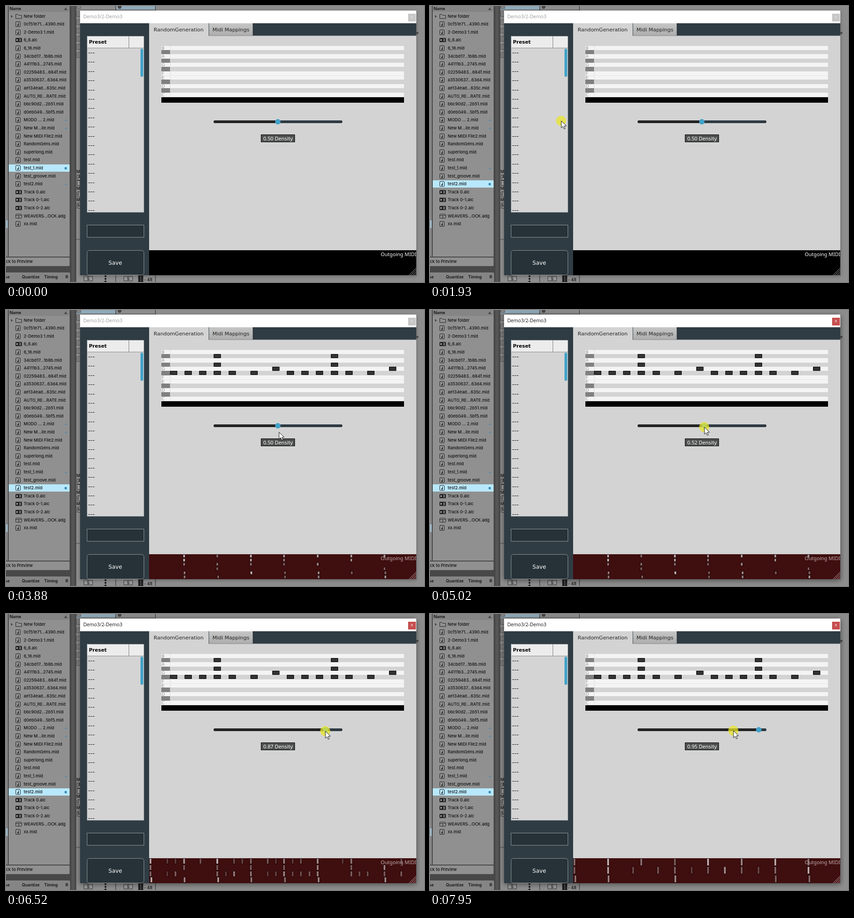
An HTML page with a canvas for the animation above (8000 ms loop, 920 px wide and 608 px high).

```html
<!DOCTYPE html>
<html lang="en">
<head>
<meta charset="utf-8">
<title>MIDI density demo</title>
<style>
html, body { margin: 0; width: 100%; height: 100%; overflow: hidden; background: #909090; }
canvas { display: block; }
</style>
</head>
<body>
<canvas id="stage" width="920" height="608"></canvas>
<script>
const ctx = document.getElementById('stage').getContext('2d');
const LOOP = 8000;
const UI = '"DejaVu Sans", sans-serif', LIST = 'Inter, sans-serif', NOTO = '"Noto Sans", sans-serif';
const BLUE = '#42a2c8';
const SLIDER = { x: 457.8, w: 281, y: 255 };

// A trailing * marks files that are in use.
const FILES = ['New folder', '0cf51e71...4390.mid', '2-Demo3 1.mid', '6_8.alc', '6_16.mid',
  '34cbd17...1b8b.mid', '44111b3...2745.mid', '02259483...684f.mid', 'a3530637...63d4.mid',
  'ae134ead...635c.mid', 'AUTO_RE...RATE.mid', 'bbc90d2...2b51.mid', 'd0eb049...5bf5.mid',
  'MODO ... 2.mid*', 'New M...ile.mid*', 'New MIDI File2.mid', 'RandomGens.mid', 'superlong.mid',
  'test.mid', 'test_1.mid*', 'test_groove.mid', 'test2.mid*', 'Track 0.alc', 'Track 0-1.alc',
  'Track 0-2.alc', 'WEAVERS...OCK.adg', 'xx.mid'];

// Pointer moves: start, end, and the place reached.
const MOVES = [[0, 180, 569, 530], [180, 500, 210, 290], [500, 850, 55, 391], [1440, 2300, 465, 150],
  [3540, 3880, 601, 269], [4010, 4220, 599, 257], [4950, 5900, 662.5, 267],
  [5900, 6590, 707.7, 257], [6790, 7070, 723.5, 256], [7740, 7950, 668, 257]];
const CLICK = 1110, DROP = 2330, OUTPUT = 3740, FOCUS = 4480, RELEASE = 6590, JUMP = 7270;
const PRESSES = [[CLICK, DROP], [FOCUS, RELEASE + 60], [JUMP, JUMP + 140], [7930, LOOP]];

function pointer(t) {
  let x = 569, y = 530;
  for (const [a, b, tx, ty] of MOVES) {
    const u = Math.min(1, Math.max(0, (t - a) / (b - a)));
    x += (tx - x) * u;
    y += (ty - y) * u;
  }
  return [x, y];
}

function density(t) {
  const [x] = pointer(t < JUMP ? Math.min(t, RELEASE) : JUMP);
  return t < FOCUS ? 0.5 : (x - SLIDER.x) / SLIDER.w;
}

function random(seed) {
  return () => {
    seed = (seed * 16807) % 2147483647;
    return seed / 2147483647;
  };
}

function box(x, y, w, h, fill, stroke, r = 0) {
  ctx.beginPath();
  ctx.roundRect(x, y, w, h, r);
  if (fill) { ctx.fillStyle = fill; ctx.fill(); }
  if (stroke) { ctx.strokeStyle = stroke; ctx.stroke(); }
}

function text(s, x, y, font, fill = '#111', align = 'left') {
  ctx.font = font;
  ctx.fillStyle = fill;
  ctx.textAlign = align;
  ctx.fillText(s, x, y);
}

function poly(points, fill, stroke) {
  ctx.beginPath();
  points.forEach(([x, y]) => ctx.lineTo(x, y));
  ctx.closePath();
  if (fill) { ctx.fillStyle = fill; ctx.fill(); }
  if (stroke) { ctx.strokeStyle = stroke; ctx.stroke(); }
}

function disc(x, y, r, fill) {
  ctx.beginPath();
  ctx.arc(x, y, r, 0, 7);
  ctx.fillStyle = fill;
  ctx.fill();
}

function line(x1, y1, x2, y2, color, width = 1) {
  ctx.beginPath();
  ctx.moveTo(x1, y1);
  ctx.lineTo(x2, y2);
  ctx.strokeStyle = color;
  ctx.lineWidth = width;
  ctx.stroke();
  ctx.lineWidth = 1;
}

function fileIcon(name, y) {
  if (name.endsWith('.mid')) {
    box(21.5, y - 5.5, 10, 11, null, '#222', 1.5);
    line(27.5, y - 3, 27.5, y + 2.5, '#111');
    box(25, y + 1, 3, 2.5, '#111');
  } else if (name.endsWith('.alc')) {
    box(21, y - 4.5, 14, 9, '#1c1c1c', null, 1);
    poly([[23, y - 2.5], [27, y], [23, y + 2.5]], '#bbb');
    for (let d = -2; d <= 2; d += 2) box(29, y + d - 0.5, 4, 1, '#bbb');
  } else if (name.endsWith('.adg')) {
    box(21.5, y - 4.5, 13, 9, null, '#222', 1);
    line(22, y - 1.5, 34, y - 1.5, '#222');
    line(28, y - 1.5, 28, y + 4, '#222');
  } else {
    poly([[21.5, y + 4.5], [21.5, y - 4.5], [26, y - 4.5], [28, y - 2.5], [34.5, y - 2.5], [34.5, y + 4.5]], null, '#222');
    poly([[11, y - 3], [15, y], [11, y + 3]], '#444');
  }
}

function drawBrowser(selected) {
  const bold = '600 9px ' + LIST, plain = '500 9.2px ' + LIST;
  box(0, 0, 154, 608, '#484848');
  box(0, 0, 4, 552, '#868686');
  box(0, 472, 4, 17, '#9fb7c5');
  box(6, 0, 134, 552, '#909090');
  box(6, 0, 134, 13, '#858585');
  box(144, 0, 7, 608, '#555');
  text('Name', 8, 6, bold);
  poly([[128, 9], [135, 9], [131.5, 3]], '#484848');
  FILES.forEach((entry, i) => {
    const name = entry.replace('*', ''), chosen = name === selected;
    const y = Math.round(22.5 + i * 17.6);
    if (chosen) box(6, y - 8, 134, 16, '#b8e8fc');
    fileIcon(name, y);
    text(name, 39, y, plain);
    if (chosen) box(129, y - 2, 5, 5, '#3f91b8');
    else if (entry !== name) poly([[129, y + 2], [134, y + 2], [133, y - 2]], '#468fad');
  });
  box(-4, 554, 144, 19, '#909090', null, 2);
  text('ck to Preview', 0, 563, plain);
  box(-4, 587, 145, 25, '#858585', null, 3);
  text('se', -2, 597, bold);
  text('Quantize', 35, 597, bold);
  text('Timing', 84, 597, bold);
  text('R', 131, 597, bold);
}

function drawTracks(first) {
  const small = '500 9px ' + LIST;
  box(154, 0, 766, 608, '#8e8e8e');
  box(first ? 155 : 243, 0, 86, 8, '#91aaba');
  for (let x = 154; x < 340; x += 87.5) line(x, 0, x, 608, '#4a4a4a', 1.5);
  line(154, 9, 329, 9, '#555');
  disc(250, 2, 4, '#454545');
  for (let y = 0; y < 120; y += 18) box(155.5, y - 5.5, 9, 11, '#828282', '#5b5b5b');
  [...'MA⋮MIMN'].forEach((s, i) => {
    const y = 365 + i * 12.5;
    if (s !== 'M') box(156.5, Math.round(y) - 5.5, 12, 11, '#9b9b9b', '#333');
    text(s, s === 'M' ? 155 : 158, y, small);
  });
  line(154, 514, 163, 514, '#444');
  for (const x of [171, 259]) {
    box(x + 0.5, 595.5, 19, 10, '#989898', '#333');
    text('S', x + 10, 601, small, '#111', 'center');
  }
  for (let y = 595; y < 608; y += 6) disc(219, y, 2.2, '#222');
  box(291, 590, 11, 18, '#222');
  box(296, 590, 1, 18, '#666');
  text('- 48', 304, 603, small);
  text('e', 903, 59, small, '#222');
}

function drawFrame(active) {
  ctx.save();
  ctx.shadowColor = active ? 'rgba(0,0,0,.5)' : 'rgba(0,0,0,.3)';
  ctx.shadowBlur = active ? 12 : 8;
  ctx.shadowOffsetY = 2;
  box(163, 10, 740, 583, '#303c44');
  ctx.restore();
  box(163, 10, 740, 28, '#fff');
  text('Demo3/2-Demo3', 170, 24, '10.7px "Open Sans", sans-serif', active ? '#111' : '#999');
  box(885, 17, 17, 17, active ? '#c64f4f' : '#c7c7c7');
  text('x', 893.5, 25, '9px ' + UI, active ? '#fff' : '#e6e6e6', 'center');
}

function drawPresets() {
  box(178, 66, 125, 388, '#d4d4d4');
  box(178, 66, 125, 26, '#ececec');
  line(178, 92.5, 303, 92.5, '#8a8a8a');
  line(270.5, 67, 270.5, 92, '#777');
  text('Preset', 182.5, 80.5, 'bold 10.7px ' + UI, '#000');
  for (let i = 0; i < 18; i++) {
    for (let j = 0; j < 3; j++) box(181 + j * 5, 103 + Math.round(i * 20.4), 4, 1, '#222');
  }
  box(296, 94, 6, 62, BLUE, null, 3);
  box(178.5, 66.5, 125, 388, null, '#8e989b');
  box(178.5, 482.5, 125, 27, '#263238', '#8e989b');
  box(178.5, 538.5, 125, 54, '#263238', '#8e989b', 5);
  text('Save', 240.5, 566.5, '12.2px ' + UI, '#fff', 'center');
}

function drawRoll(filled) {
  const rowY = row => Math.floor(88 + row * 9.37);
  box(342, 88, 534, 113, '#d3d3d3');
  [...'B-A-G-FE-D-C'].forEach((key, i) => {
    const y = rowY(i), h = rowY(i + 1) - y;
    if (key === '-') return box(342, y, 19, h, '#808080');
    box(342, y, 534, h, '#f4f4f4');
    line(361.5, y, 361.5, y + h, '#ddd');
    text(key, 342.5, y + 5.5, '9.5px ' + UI, '#929292');
  });
  line(342, 153.5, 876, 153.5, '#e4e4e4');
  box(342, 201, 534, 12, '#000');
  if (!filled) return;
  const note = (beat, row) => box(Math.round(361 + beat * 32.14) + 0.5, rowY(row) + 0.5, 15, 8, '#333', '#000');
  for (const bar of [0, 8]) {
    for (let beat = 0; beat < 5; beat++) note(bar + beat, 5);
    note(bar + 5.5, 5);
    note(bar + 3, 1);
    note(bar + 3, 3);
    note(bar + 7, 4);
  }
}

function drawSlider(v) {
  const { x, w, y } = SLIDER, thumb = x + w * v;
  ctx.lineCap = 'round';
  line(x + 2.2, y, x + w - 1.3, y, '#2e3a43', 6);
  line(x + 2.2, y, thumb, y, '#222', 6);
  ctx.lineCap = 'butt';
  disc(thumb, y, 6, BLUE);
  box(561.5, 283.5, 74, 16, '#4e504f', '#000');
  text(v.toFixed(2) + ' Density', 598.7, 292.5, '11.3px ' + NOTO, '#fff', 'center');
}

// Denser settings use fewer, taller rows; beats sound most often and loudest.
function drawNotes(v) {
  const level = [0.57, 0.86, 0.92].filter(limit => v >= limit).length;
  const rows = 6 - level, rowH = 55 / rows;
  const first = Math.max(0, 4 - 2 * level), last = level < 2 ? 28 : 31;
  const rnd = random(4021 + level * 977);
  for (let row = 0; row < rows; row++) {
    const onBeat = level === 0 || row === rows - 1 || (level + row) % 3 === 0;
    const y = Math.round(538 + row * rowH) + 0.5;
    for (let step = first; step <= last; step++) {
      const chance = step % 4 === 0 ? 0.45 + v / 2 : onBeat ? 0 : step % 2 === 0 ? 0.7 * v : level === 2 ? 0.4 : 0.06;
      const accent = step % 4 === 0 ? 0.3 : 0.15;
      const hit = rnd() < chance, gain = accent + 0.4 * rnd() ** 2;
      if (!hit) continue;
      const x = Math.round(315 + step * 18.4 + (2 * row > rows ? 1.5 : 0)) + 0.5;
      box(x, y, 5, Math.round(rowH) - 2, `rgba(255,245,245,${gain})`, '#180405');
    }
  }
}

function drawOutput(on, v) {
  box(315, 538, 588, 55, on ? '#3f0e0f' : '#000');
  if (on) drawNotes(v);
  text('Outgoing MIDI', 903, 548, '11.1px ' + NOTO, on ? '#c4aeae' : '#fff', 'right');
  for (let d = 4; d <= 16; d += 4) line(903 - d, 593, 903, 593 - d, on ? '#c0a9a9' : '#aaa');
}

function drawContent(t, v) {
  box(315, 66, 588, 472, '#d3d3d3');
  box(315, 38, 131, 28, '#d3d3d3');
  const shade = ctx.createLinearGradient(0, 38, 0, 65);
  shade.addColorStop(0, '#c6c6c6');
  shade.addColorStop(1, '#adadad');
  box(447, 38, 96, 27, shade);
  line(446.5, 38, 446.5, 66, '#39454c');
  line(446, 65.5, 903, 65.5, '#8b8f92');
  text('RandomGeneration', 380, 53, '11.3px ' + UI, '#222', 'center');
  text('Midi Mappings', 495, 53, '11.3px ' + UI, '#222', 'center');
  drawRoll(t >= DROP);
  drawSlider(v);
  drawOutput(t >= OUTPUT, v);
}

function drawPointer(t) {
  if (t < 180) return;
  const [x, y] = pointer(t).map(Math.round);
  if (PRESSES.some(([a, b]) => t >= a && t < b)) disc(x - 0.5, y, 11, 'rgba(234,230,40,.74)');
  const shape = [[0, 0], [0, 15.5], [3.6, 12.3], [6.2, 18], [8.6, 17], [6.2, 11.4], [11, 11.2]];
  poly(shape.map(([px, py]) => [x + px, y + py]), '#fff', '#111');
}

function draw(t) {
  ctx.textBaseline = 'middle';
  ctx.lineWidth = 1;
  drawTracks(t >= 1930);
  drawBrowser(t < CLICK ? 'test_1.mid' : 'test2.mid');
  drawFrame(t >= FOCUS);
  drawPresets();
  drawContent(t, density(t));
  drawPointer(t);
}

const start = performance.now();
function tick() {
  draw((performance.now() - start) % LOOP);
  requestAnimationFrame(tick);
}
tick();
</script>
</body>
</html>
```
